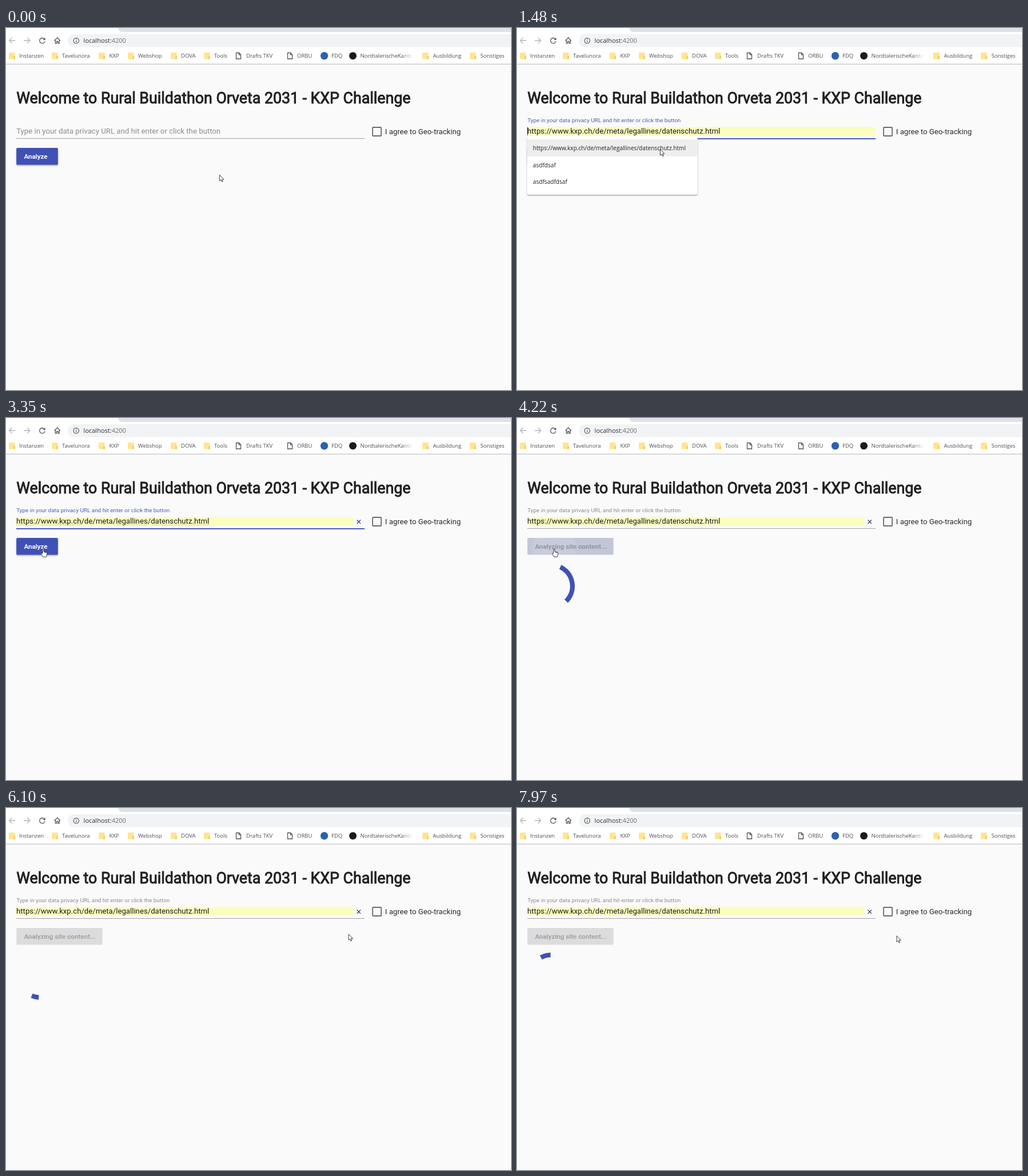
Animation of 883 by 634 pixels, one loop 8 s. Source, as an HTML page:

```html
<!DOCTYPE html>
<html lang="en">
<head>
<meta charset="utf-8">
<title>Privacy analyzer</title>
<style>
html, body { margin: 0; width: 100%; height: 100%; overflow: hidden; background: #fafafa; }
svg { display: block; }
text { font-family: Roboto, sans-serif; font-size: 13.2px; white-space: pre; }
.ui, .ui text { font-family: "Open Sans", "Noto Sans", sans-serif; }
#marks text { font-size: 9.5px; fill: #4b4e52; }
.list text { font-size: 10.1px; fill: #222; }
.icon { fill: none; stroke: #50545a; stroke-width: 1.3; }
</style>
</head>
<body>
<svg width="883" height="634" viewBox="0 0 883 634">
  <defs>
    <filter id="shadow" x="-10%" y="-20%" width="120%" height="150%">
      <feDropShadow dx="0" dy="1.3" stdDeviation="1.1" flood-opacity=".4"/>
    </filter>
    <linearGradient id="fade" gradientUnits="userSpaceOnUse" x1="692" x2="712" y1="0" y2="0">
      <stop stop-color="#fff" stop-opacity="0"/><stop offset="1" stop-color="#fff"/>
    </linearGradient>
    <clipPath id="buttonClip"><rect id="clipBox" x="18.2" y="210" height="29.6" rx="1.7"/></clipPath>
  </defs>

  <!-- browser chrome -->
  <rect width="883" height="63" fill="#fff"/>
  <path d="M196 0H883V7H204Q197 7 196 0Z" fill="#dee1e6"/>
  <rect x="108" y="11" width="800" height="22.5" rx="11.2" fill="#f1f3f4"/>
  <rect y="62.7" width="883" height="1" fill="#b5b5b5"/>
  <g class="icon">
    <path d="M16 22H6M10.5 17L5.8 22L10.5 27M31 22H41.5M37 17L41.7 22L37 27" stroke="#b4b6b9"/>
    <path d="M67 19.2A4.7 4.7 0 1 0 68 23"/>
    <path d="M68.5 16.8V21H64.3Z" fill="#50545a" stroke="none"/>
    <path d="M84.5 22.4L89.8 17L95 22.4M86.4 21V26.8H88.6V23.4H91V26.8H93.2V21"/>
    <circle cx="122.8" cy="22.3" r="4.7" stroke-width="1.1"/>
    <path d="M122.8 21.7V25M122.8 19.5V20.7" stroke-width="1.1"/>
  </g>
  <text class="ui" x="135.6" y="26" style="font-size:11px" fill="#2c2e31">localhost:<tspan fill="#6a6d71">4200</tspan></text>
  <g id="marks" class="ui"></g>
  <rect x="690" y="40" width="36" height="18" fill="url(#fade)"/>

  <!-- page -->
  <text x="18.2" y="132" style="font-size:26.72px" fill="#212121" stroke="#212121" stroke-width=".95">Welcome to Rural Buildathon Orveta 2031 - KXP Challenge</text>
  <rect x="641" y="174" width="15" height="15" rx="1" fill="none" stroke="#6a6a6a" stroke-width="1.8"/>
  <text x="662.8" y="186" fill="#2a2a2a">I agree to Geo-tracking</text>
  <path d="M18 193.5H627" stroke="#a3a3a3"/>
  <path id="focusLine" stroke="#4c5db9" stroke-width="2"/>
  <rect id="fill" x="18" y="173.3" height="14.5" fill="#faffbd"/>
  <text id="url" x="18" y="185" fill="#1c1c1c"></text>
  <path id="spell" d="M18 187.3H49M61 187.3H133M194 187.3H248M255 187.3H357" stroke="#c98a5a" stroke-dasharray="1.5 1.5"/>
  <path id="clear" d="M613.5 178.5L620 185M620 178.5L613.5 185" stroke="#303a75" stroke-width="1.2"/>
  <text id="label">Type in your data privacy URL and hit enter or click the button</text>
  <rect id="caret" y="173.5" width="1" height="14.5" fill="#333"/>

  <rect id="button" x="18.2" y="210" height="29.6" rx="1.7"/>
  <g clip-path="url(#buttonClip)"><circle id="ripple" cx="65" cy="230" fill="#fff"/></g>
  <text id="caption" x="31.5" y="229.2" style="font-size:11.65px;font-weight:500" stroke-width=".2"></text>
  <path id="spinner" fill="none" stroke="#3f51b5" stroke-width="8.3"/>

  <g id="list" class="ui list">
    <rect x="17.7" y="188.5" width="298" height="103.2" rx="3" fill="#fff" filter="url(#shadow)"/>
    <rect id="hover" x="18" y="195" width="297.5" height="29.7" fill="#eee"/>
    <text id="choice" x="27.8" y="213.7"></text>
    <text x="27.8" y="243.5">asdfdsaf</text>
    <text x="27.8" y="273.3">asdfsadfdsaf</text>
  </g>

  <g id="pointer" stroke="#2b2b2b" stroke-width=".9" fill="#fff" stroke-linejoin="round">
    <path id="arrow" d="M.4 .4V11L2.9 8.8L4.5 12.5L6.2 11.8L4.6 8.2H7.9Z"/>
    <path id="hand" d="M-1 8V.8A1 1 0 0 1 1.1 .8V5L6 6.2Q7 6.6 6.9 8L6.3 11.5L5.6 14.3H-.3L-3.4 9.3Q-3.6 7.4-2.1 7.6L-1 8.8M2.8 5.6V7.4M4.6 6V7.6"/>
    <path id="beam" d="M-2 0H2M0 0V13M-2 13H2" fill="none"/>
  </g>
</svg>
<script>
const $ = id => document.getElementById(id);
const set = (id, attrs) => { for (const k in attrs) $(id).setAttribute(k, attrs[k]); };
const show = (id, on) => { $(id).style.display = on ? "" : "none"; };
const clamp = x => Math.min(1, Math.max(0, x));
const mix = (a, b, p) => a + (b - a) * p;
const mixRgb = (a, b, p) => `rgb(${a.map((v, i) => Math.round(mix(v, b[i], p)))})`;

function bezier(x1, y1, x2, y2) {
  const at = (s, a, b) => 3 * (1 - s) ** 2 * s * a + 3 * (1 - s) * s * s * b + s ** 3;
  return x => {
    let lo = 0, hi = 1;
    for (let i = 0; i < 20; i++) {
      const mid = (lo + hi) / 2;
      if (at(mid, x1, x2) < x) lo = mid; else hi = mid;
    }
    return at(lo, y1, y2);
  };
}
const swift = bezier(.25, .8, .25, 1), sweep = bezier(.35, 0, .25, 1);
const progress = (t, start, length) => swift(clamp((t - start) / length));

const URL_TEXT = "https://www.kxp.ch/de/meta/legallines/datenschutz.html";
const FOCUS = 400, LIST = 560, HOVER = 1020, PICK = 1800, PRESS = 3900, SUBMIT = 4080;
$("url").textContent = $("choice").textContent = URL_TEXT;

// bookmarks: icon, icon x, label x, label
const icons = {
  folder: x => `<rect x="${x}" y="43" width="10.5" height="11.6" rx="1" fill="#ffe591"/>
    <path d="M${x + 8} 49H${x + 11}V54.6H${x + 8}Z" fill="#f5cf63"/>`,
  page: x => `<path class="icon" stroke-width="1.1" d="M${x + .5} 43.5H${x + 5.5}L${x + 8.5} 46.5V54H${x + .5}ZM${x + 5.3} 43.5V46.8H${x + 8.5}"/>`,
  blue: x => `<circle cx="${x + 6.5}" cy="48.7" r="6.7" fill="#2d5fb3"/>`,
  dark: x => `<circle cx="${x + 6.5}" cy="48.7" r="6.5" fill="#1b1b1d"/>`
};
$("marks").innerHTML = [
  ["folder", 5, 23, "Instanzen"], ["folder", 80, 98, "Tavelunora"], ["folder", 162, 180.5, "KXP"],
  ["folder", 213, 231, "Webshop"], ["folder", 288, 306, "DOVA"], ["folder", 346, 364, "Tools"],
  ["page", 402, 420, "Drafts TKV"], ["page", 492, 509, "ORBU"], ["blue", 550, 569, "FDQ"],
  ["dark", 600, 619.5, "NordtalerischeKanto"], ["folder", 728, 746.5, "Ausbildung"], ["folder", 811, 829.5, "Sonstiges"]
].map(([icon, x, tx, name]) => icons[icon](x) + `<text x="${tx}" y="52.2">${name}</text>`).join("");

// pointer path: time, x, y
const path = [
  [80, 373, 257], [400, 290, 181], [600, 276, 182], [870, 272, 192], [1020, 262, 204], [1180, 250, 212],
  [2020, 250, 212], [2190, 233, 206], [2500, 150, 214], [2880, 69, 230], [2950, 65, 229], [4300, 65, 229],
  [4700, 300, 260], [5080, 370.5, 249.5], [5540, 375, 237], [5800, 460, 228], [6100, 598.5, 220.5],
  [6420, 638, 228], [6900, 687, 226], [7270, 683, 238], [7970, 663.5, 223.5]
];
function pointerAt(t) {
  const i = path.findIndex(p => p[0] >= t);
  if (i < 0) return path[path.length - 1].slice(1);
  if (!i) return path[0].slice(1);
  const [a, b] = [path[i - 1], path[i]], p = (t - a[0]) / (b[0] - a[0]);
  return [mix(a[1], b[1], p), mix(a[2], b[2], p)];
}

// one-second cycle: the head runs ahead, then the tail catches up, while everything turns
function spinnerPath(t) {
  const phase = Math.floor(t / 500), base = 270 * (phase >> 1) + .18 * t;
  const grown = 270 * sweep(t / 500 - phase);
  const from = base + (phase % 2 ? grown : 0), to = base + (phase % 2 ? 288 : 18 + grown);
  const point = deg => {
    const a = deg * Math.PI / 180;
    return `${59.7 + 37.2 * Math.sin(a)} ${294.5 - 37.2 * Math.cos(a)}`;
  };
  return `M${point(from)}A37.2 37.2 0 ${to - from > 180 ? 1 : 0} 1 ${point(to)}`;
}

function draw(t) {
  const focused = t >= FOCUS && t < PRESS, picked = t >= PICK;
  const preview = t >= HOVER && !picked, busy = t >= SUBMIT;

  const up = progress(t, FOCUS, 400);
  set("label", {
    transform: `translate(18.2 ${mix(185, 165, up)}) scale(${mix(1, .752, up)})`,
    fill: focused ? mixRgb([138, 138, 138], [76, 93, 185], up) : "#8c8c8c"
  });
  const half = 304.5 * mix(.5, 1, progress(t, FOCUS, 300));
  set("focusLine", {
    d: `M${322.5 - half} 194H${322.5 + half}`,
    opacity: progress(t, FOCUS, 300) * (1 - progress(t, PRESS, 300))
  });

  show("fill", preview || picked);
  set("fill", { width: picked ? 589.5 : 609 });
  show("url", preview || picked);
  show("spell", picked && t < PRESS);
  show("clear", picked);
  const blinkStart = picked ? 1850 : 480;
  show("caret", focused && (t < blinkStart || Math.floor((t - blinkStart) / 500) % 2 === 0));
  set("caret", { x: picked ? 18.3 + urlWidth : 18 });

  show("list", t >= LIST && !picked);
  show("hover", preview);

  const width = busy ? 150.5 : 72.6, grey = progress(t, SUBMIT, 400);
  set("button", {
    width, fill: mixRgb([63, 81, 181], [220, 220, 220], grey), filter: busy ? "none" : "url(#shadow)"
  });
  set("clipBox", { width });
  const ink = busy ? "rgba(0,0,0,.24)" : "#fff";
  set("caption", { fill: ink, stroke: ink });
  $("caption").textContent = busy ? "Analyzing site content..." : "Analyze";
  set("ripple", {
    r: 48 * clamp((t - PRESS) / 400),
    opacity: t < PRESS ? 0 : .14 * (1 - clamp((t - SUBMIT) / 400))
  });
  show("spinner", busy);
  if (busy) set("spinner", { d: spinnerPath(t - SUBMIT) });

  const [x, y] = pointerAt(t);
  const hand = t >= 2920 && t < 4340, beam = t > 360 && t < LIST;
  set("pointer", { transform: `translate(${x} ${y})` });
  show("hand", hand);
  show("beam", beam);
  show("arrow", !hand && !beam);
}

const urlWidth = $("url").getComputedTextLength();
function tick() {
  draw(performance.now() % 8000);
  requestAnimationFrame(tick);
}
tick();
</script>
</body>
</html>
```
